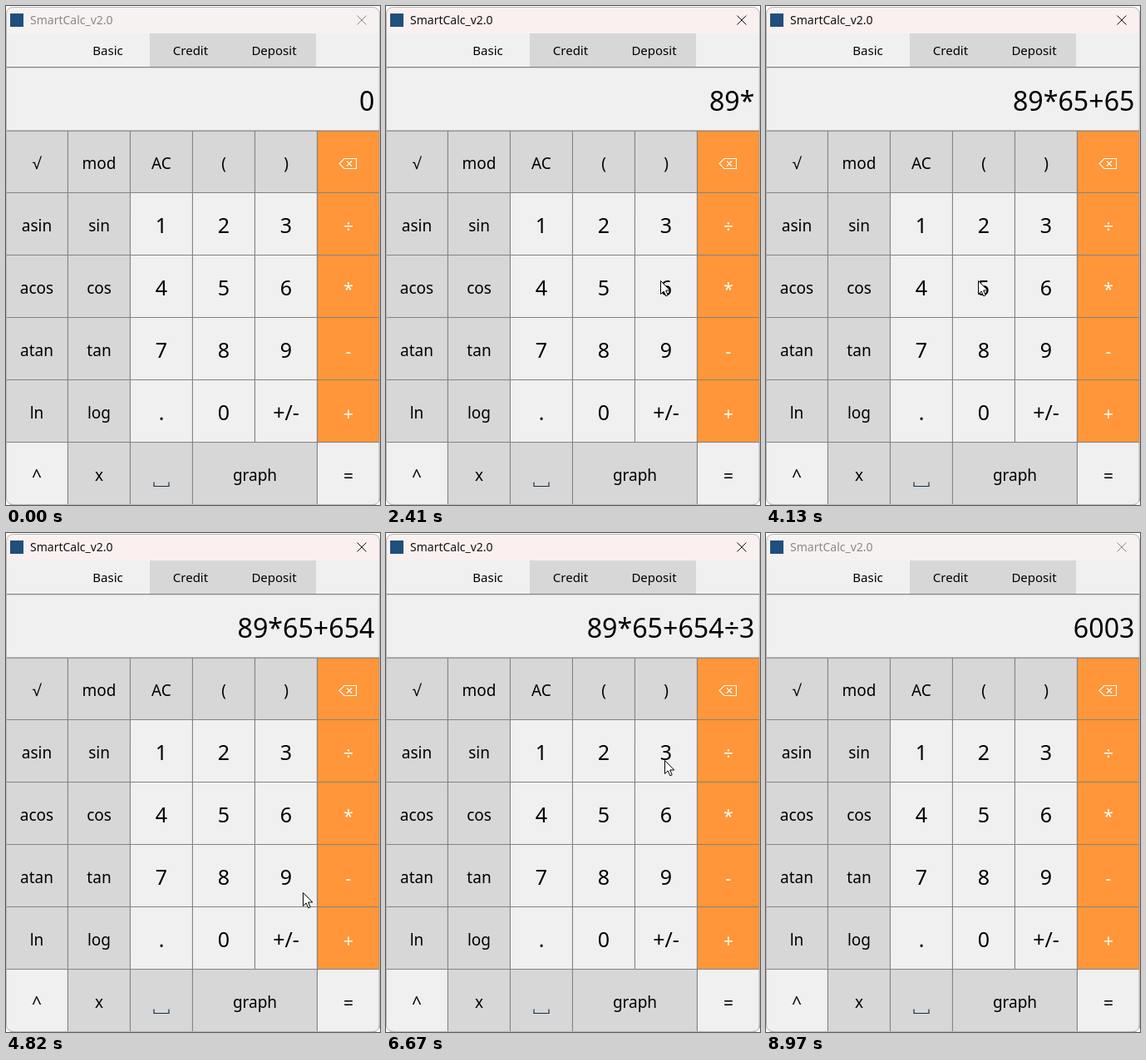
Animation of 450x600 px, one loop 9.03 s. Source, as an HTML page:

```html
<!DOCTYPE html>
<html lang="en">
<head>
<meta charset="utf-8">
<title>Calculator</title>
<style>
  html, body { margin: 0; width: 100%; height: 100%; overflow: hidden; background: #fff; }
  svg { display: block; width: 100%; height: 100%; }
  text { font-family: "Noto Sans", "Open Sans", "DejaVu Sans", sans-serif; text-anchor: middle; }
  .line { stroke: #838383; stroke-width: 1.25; fill: none; }
</style>
</head>
<body>
<svg viewBox="0 0 450 600">
  <clipPath id="window"><rect y="1" width="450" height="599" rx="8"/></clipPath>
  <g clip-path="url(#window)">
    <rect width="450" height="600" fill="#f0f0f0"/>
    <rect id="titlebar" width="450" height="33"/>
    <rect x="5" y="9" width="16" height="16" fill="#1f4f7d"/>
    <text id="title" x="29" y="22" font-size="14" style="text-anchor:start">SmartCalc_v2.0</text>
    <path id="close" d="M422.5 11.5l11 11m0-11l-11 11" fill="none"/>
    <rect x="173" y="33" width="200" height="40" fill="#d7d7d7"/>
    <g font-size="15">
      <text x="122.500" y="59">Basic</text>
      <text x="222" y="59">Credit</text>
      <text x="322.500" y="59">Deposit</text>
    </g>
    <text id="display" x="443.500" y="126" font-size="32.200" style="text-anchor:end"></text>
    <g id="keys"></g>
    <path class="line" d="M0 73.500H450M449.500 73V600M0 150H450"/>
    <path d="M407 183.500h14.500v12h-14.500l-6-6ZM410 186.500l6 6m0-6l-6 6" fill="none" stroke="#fff" stroke-width="1.1"/>
    <path d="M178 572.500v5h18v-5" fill="none" stroke="#15304a" stroke-width="1.2"/>
  </g>
  <rect x=".5" y="1.500" width="449" height="598" rx="8" fill="none" stroke="#b9b7b7"/>
  <path id="cursor" d="M.5 .5V16.500L4.200 13L6.800 18.800L9.200 17.800L6.700 12H11.800Z" fill="#fff" stroke="#000"/>
</svg>
<script>
const LOOP = 9030, CELL = 75, GRID_TOP = 150;
const HOLD = 80, MAX_TRAVEL = 900;
const find = id => document.getElementById(id);

function add(parent, tag, attributes, text = '') {
  const node = document.createElementNS('http://www.w3.org/2000/svg', tag);
  for (const name in attributes) node.setAttribute(name, attributes[name]);
  node.textContent = text;
  parent.append(node);
}

// '#' keys have a drawn symbol; '_' is covered by the wide key before it.
const rows = ['√ mod AC ( ) #', 'asin sin 1 2 3 ÷', 'acos cos 4 5 6 *',
  'atan tan 7 8 9 -', 'ln log . 0 +/- +', '^ x # graph _ ='].map(row => row.split(' '));

function textStyle(label) {
  if (/^(\d|\.|\+\/-)$/.test(label)) return { size: 25, baseline: 48 };
  if (/^[÷*+^=-]$/.test(label)) return { size: 21, baseline: 48 };
  return { size: 19, baseline: 46 };
}

const tips = {};
rows.forEach((row, r) => row.forEach((label, c) => {
  if (label === '_') return;
  const x = c * CELL, y = GRID_TOP + r * CELL;
  const width = label === 'graph' ? 2 * CELL : CELL;
  const operator = c === 5 && r < 5;
  const light = /^([\d.^=]|\+\/-)$/.test(label);
  const keys = find('keys');
  add(keys, 'rect', { x, y, width, height: CELL, fill: operator ? '#ff9639' : light ? '#f0f0f0' : '#d7d7d7' });
  add(keys, 'path', { class: 'line', d: `M${x} ${y + 74.5}h${width - 0.5}v-74.5` });
  if (label !== '#') {
    const { size, baseline } = textStyle(label);
    const fill = operator ? '#fff' : '#000';
    add(keys, 'text', { x: x + width / 2 - 0.5, y: y + baseline, 'font-size': size, fill }, label);
  }
  tips[label] = [x + 30, y + 30];
}));

// Pointer stops: arrival time, key to press (if any), position (default: on the key).
const stops = [
  [0, '', [395, 602]], [730, '8'], [1100, '9'], [1980, '*'], [2400, '6'], [2620, '5'],
  [3090, '+'], [3480, '', [328, 404]], [3720, '6'], [4050, '5'], [4400, '4'],
  [4800, '', [357, 432]], [5960, '÷', [394, 269]], [6400, '3'], [7330, '=', [410, 580]],
  [8770, '', [190, 602]],
].map(([time, key, tip = tips[key]]) => ({ time, key, tip }));

const firstPress = stops.find(stop => stop.key).time + HOLD;

function displayAt(t) {
  const typed = stops.filter(stop => stop.time + HOLD <= t).map(stop => stop.key).join('');
  return typed.endsWith('=') ? '6003' : typed || '0';
}

function pointerAt(t) {
  const next = stops.findIndex(stop => stop.time > t);
  if (next < 0) return stops[stops.length - 1].tip;
  const from = stops[next - 1], to = stops[next];
  const depart = Math.max(from.time + 2 * HOLD, to.time - MAX_TRAVEL);
  const p = Math.max(0, (t - depart) / (to.time - depart));
  const ease = p * p * (3 - 2 * p);
  return from.tip.map((v, axis) => Math.round(v + (to.tip[axis] - v) * ease));
}

const start = performance.now();
function draw() {
  const t = (performance.now() - start) % LOOP;
  const active = t >= firstPress && t < 8970;
  const ink = active ? '#111' : '#8b8988';
  find('titlebar').setAttribute('fill', active ? '#faf0ef' : '#f5f2f1');
  find('title').setAttribute('fill', ink);
  find('close').setAttribute('stroke', ink);
  find('display').textContent = displayAt(t);
  find('cursor').setAttribute('transform', `translate(${pointerAt(t)})`);
  requestAnimationFrame(draw);
}
draw();
</script>
</body>
</html>
```
